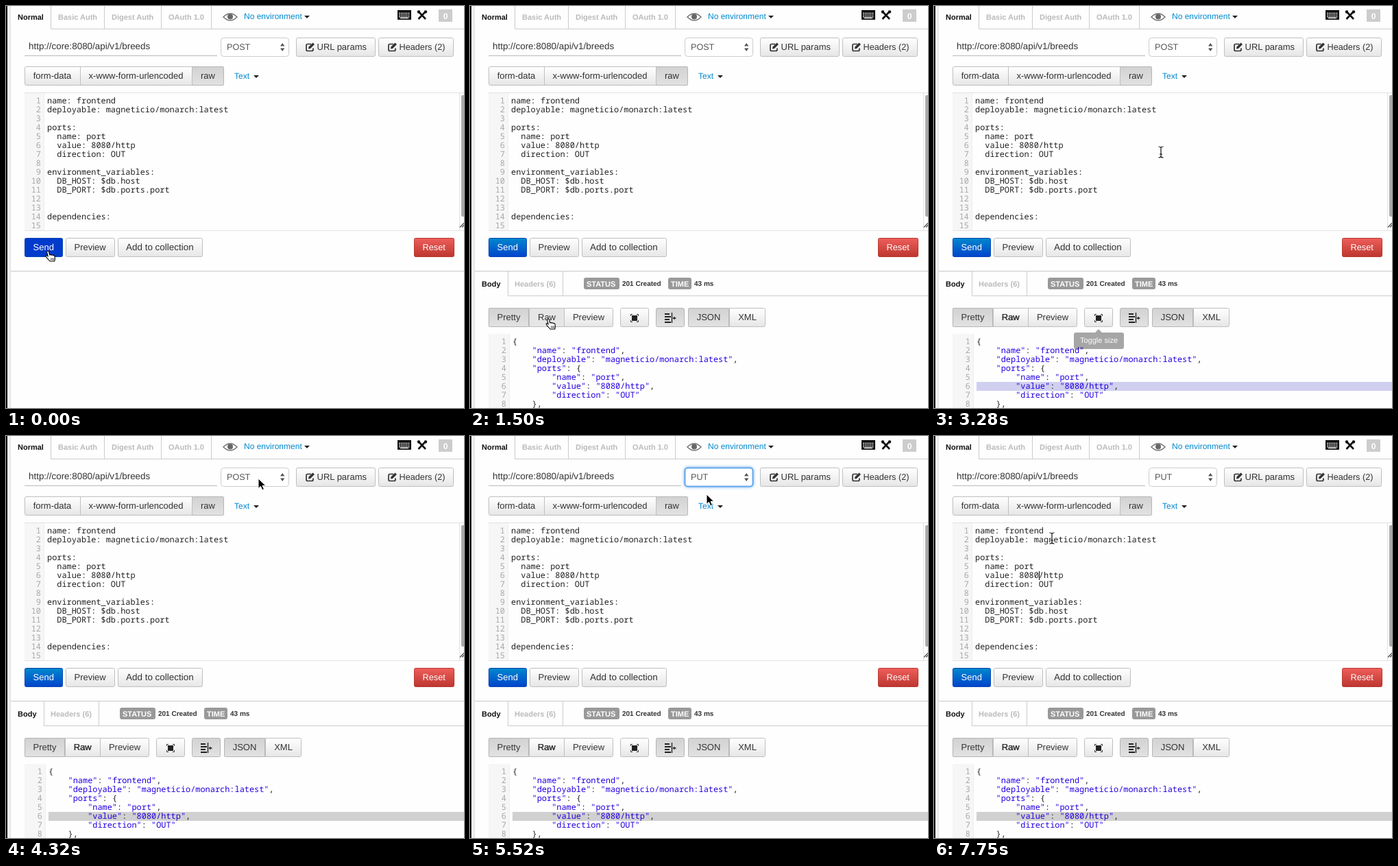
An HTML page that plays this animation: 668 by 586 pixels, repeating every 8 s.

```html
<!DOCTYPE html>
<html lang="en">
<head>
<meta charset="utf-8">
<title>API client</title>
<style>
html, body { margin: 0; width: 100%; height: 100%; overflow: hidden; background: #fefefe; }
svg { display: block; width: 668px; height: 586px; }
text { font-family: "Liberation Sans", Arial, sans-serif; text-rendering: geometricPrecision; }
.mono { font-family: "Noto Sans Mono", monospace; font-size: 11.91px; white-space: pre; }
.bold { font-weight: bold; }
</style>
</head>
<body>
<svg id="stage" viewBox="0 0 668 586" xmlns="http://www.w3.org/2000/svg"></svg>
<script>
const LOOP = 8000, TICK = 148.8, ROW = 13;
const stage = document.getElementById('stage');

const text = (x, y, s, size = 13, fill = '#333', more = '') =>
  `<text x="${x}" y="${y}" font-size="${size}" fill="${fill}" ${more}>${s}</text>`;
const bold = (x, y, s, size = 11, fill = '#bbb', more = '') => text(x, y, s, size, fill, 'class="bold" ' + more);
const rect = (x, y, w, h, fill, more = '') =>
  `<rect x="${x}" y="${y}" width="${w}" height="${h}" fill="${fill}" ${more}/>`;
const path = (d, fill, more = '') => `<path d="${d}" fill="${fill}" ${more}/>`;
const line = (d, stroke = '#ccc', width = 1) => path(d, 'none', `stroke="${stroke}" stroke-width="${width}"`);
const group = (id, body, more = '') => `<g id="${id}" ${more}>${body}</g>`;
const gradient = (id, top, bottom) =>
  `<linearGradient id="${id}" x2="0" y2="1"><stop stop-color="${top}"/><stop offset="1" stop-color="${bottom}"/></linearGradient>`;

const button = (x, y, w, fill = 'url(#plain)', stroke = '#bfbfbf', id = '') =>
  rect(x + .5, y + .5, w - 1, 27, fill, `rx="2" stroke="${stroke}" ${id && `id="${id}"`}`);
const caretDown = (x, y, fill) => path(`M${x - 4} ${y}h8l-4 4z`, fill);
const editIcon = x =>
  line(`M${x + 8} 55.5h-5q-2 0-2 2v6q0 2 2 2h6q2 0 2-2v-2`, '#333', 1.7) +
  path(`M${x + 4} 62.5l.5-3 6-6 2.5 2.5-6 6z`, '#333');

// A row of joined buttons: edges are the x positions, active is the pressed one.
function segments(y, edges, labels, active) {
  const last = edges[edges.length - 1];
  let out = button(edges[0], y, last - edges[0]);
  labels.forEach((label, i) => {
    const w = edges[i + 1] - edges[i];
    if (i === active) out += button(edges[i], y, w, 'url(#pressed)', '#b5b5b5');
    if (i) out += line(`M${edges[i] + .5} ${y}v28`, '#bfbfbf');
    out += text(edges[i] + w / 2, y + 18, label, 13, '#333', 'text-anchor="middle"');
  });
  return out;
}

function code(x, numberX, baseline, rows, fill) {
  return rows.map((row, i) => {
    const y = baseline + i * ROW;
    return text(numberX, y, i + 1, 11.91, '#a8a8a8', 'class="mono" text-anchor="end"') +
      text(x, y, row, 11.91, fill(row), 'class="mono"');
  }).join('');
}

const request = ['name: frontend', 'deployable: magneticio/monarch:latest', '', 'ports:', '  name: port',
  '  value: 8080/http', '  direction: OUT', '', 'environment_variables:', '  DB_HOST: $db.host',
  '  DB_PORT: $db.ports.port', '', '', 'dependencies:', ''];
const reply = ['{', '    "name": "frontend",', '    "deployable": "magneticio/monarch:latest",', '    "ports": {',
  '        "name": "port",', '        "value": "8080/http",', '        "direction": "OUT"', '    },'];
const tint = row => row.replace(/"[^"]*"/g, '<tspan fill="#2200e0">$&</tspan>');
const methods = ['GET', 'POST', 'PUT', 'PATCH', 'DELETE', 'COPY', 'HEAD', 'OPTIONS', 'LINK', 'UNLINK', 'PURGE'];

const defs = '<defs>' + gradient('plain', '#fff', '#e6e6e6') + gradient('pressed', '#d2d2d2', '#e2e2e2') +
  gradient('blue', '#0088cc', '#0044cc') + gradient('red', '#ee5f5b', '#bd362f') +
  gradient('pick', '#5b93f5', '#2467ee') + '</defs>';

const frame = rect(0, 0, 668, 586, '#fefefe') + rect(2, 0, 5, 586, '#efefef') +
  rect(0, 0, 2, 586, '#000') + line('M6.5 0v586', '#e0e0e0');

const keys = [0, 1, 2].map(r => line(`M573 ${10.5 + r * 2.6}h16`, '#fff', 1.2)).join('') +
  [0, 1, 2, 3, 4, 5].map(c => line(`M${575.5 + c * 2.5} 9v7.5`, '#111', .8)).join('');

const header =
  line('M65.5 0v33.5H668M143.5 0v33M226.5 0v33M299.5 0v33') +
  bold(17, 20, 'Normal', 11, '#111') + bold(76, 20, 'Basic Auth') +
  bold(154, 20, 'Digest Auth') + bold(237, 20, 'OAuth 1.0') +
  path('M317 16q10-10 20 0q-10 10-20 0z', '#fff', 'stroke="#777" stroke-width="1.6"') +
  '<circle cx="327" cy="15.5" r="4" fill="#666"/>' +
  text(347, 19, 'No environment', 12, '#0088cc') + caretDown(439, 14, '#222') +
  rect(571, 6, 20, 14, '#111') + keys + line('M575 17.5h12', '#fff', 1.4) +
  line('M601.5 8l10.5 11M612 8l-10.5 11', '#111', 2.6) +
  '<circle cx="602" cy="8.5" r="2.2" fill="#111"/><circle cx="612" cy="8.5" r="2.2" fill="#111"/>' +
  rect(631, 5, 20, 18, '#ccc') + bold(641, 18.5, '0', 12, '#fff', 'text-anchor="middle"');

const urlRow =
  text(33, 63, 'http://core:8080/api/v1/breeds', 13.4) + line('M27 72.5h281', '#bbb') +
  rect(313.5, 46.5, 99, 27, '#fff', 'id="select" rx="4" stroke="#ccc"') +
  '<text id="method" x="322" y="64" font-size="12.6" fill="#555"></text>' +
  path('M400 58.5l3.2-4.5 3.2 4.5zM400 61.5l3.2 4.5 3.2-4.5z', '#555') +
  button(423, 46, 116) + editIcon(437) + text(453.5, 64, 'URL params') +
  button(543, 46, 110) + editIcon(557) + text(573.5, 64, 'Headers (2)', 12.7);

const editor =
  segments(88, [27, 108, 271, 318], ['form-data', 'x-www-form-urlencoded', 'raw'], 2) +
  text(333, 106, 'Text', 12, '#0088cc') + caretDown(365, 101, '#222') +
  rect(27, 126, 28, 201, '#f6f6f6') + line('M55.5 126v201', '#eee') +
  line('M27 126.5h641M27 327.5h641M661.5 127v200', '#e2e2e2') +
  rect(664, 130, 6, 177, '#aaa', 'rx="2"') +
  line('M662 322.5l6-6M665 322.5l3-3', '#444', 1.2) +
  code(60, 51, 142, request, () => '#222') + rect(153, 197, 1, 13, '#000', 'id="caret"') +
  button(27, 338, 56, 'url(#blue)', '#0a45b5', 'send') + text(39.5, 356, 'Send', 13, '#fff') +
  button(87, 338, 72) + text(99.5, 356, 'Preview') +
  button(163, 338, 124) + text(175, 356, 'Add to collection', 13.45) +
  button(595, 338, 59, 'url(#red)', '#b5382f') + text(607.5, 356, 'Reset', 12.8, '#fff') +
  line('M7 386.5h661', '#c8c8c8');

const response =
  line('M55.5 387v35.5H668M135.5 387v35') +
  bold(17, 409, 'Body', 11, '#111') + bold(65, 409, 'Headers (6)') +
  rect(166, 396, 52, 17, '#999', 'rx="3"') + bold(170, 408.5, 'STATUS', 11, '#fff') +
  bold(222, 408, '201 Created', 10, '#333') +
  rect(289, 396, 34, 17, '#999', 'rx="3"') + bold(293, 408.5, 'TIME', 11, '#fff') +
  bold(327, 408, '43 ms', 10, '#333') +
  segments(440, [27, 86, 137, 209], ['Pretty', 'Raw', 'Preview'], 0) +
  rect(87, 441, 50, 26, '#e6e6e6', 'id="rawHover"') + text(99, 458, 'Raw', 13, '#333') +
  button(219, 440, 42) + rect(236, 451, 8, 8, '#222') +
  line('M234.5 452v-2.5h2.5M243 449.5h2.5v2.5M245.5 458v2.5H243M237 460.5h-2.5V458', '#333') +
  button(271, 440, 42, 'url(#pressed)', '#b5b5b5') +
  line('M284 449h7M284 453h9M284 457h7M284 461h9', '#222', 2) + line('M294.5 447v15', '#222', 1.4) +
  path('M295.5 455l3-2.5v1.7h2v1.6h-2v1.7z', '#222') +
  segments(440, [318, 378, 431], ['JSON', 'XML'], 0) +
  rect(27, 478, 30, 108, '#f6f6f6') + line('M57.5 478v108', '#eee') +
  rect(62, 548, 606, 13, '#d1cff0', 'id="mark"') +
  code(62, 53, 493, reply.map(tint), () => '#222') +
  rect(234, 548, 1, 13, '#000', 'id="replyCaret"') +
  group('tip', path('M235 476l5-5 5 5z', '#000') + rect(204, 476, 73, 24, '#000', 'rx="3"') +
    text(240.5, 491, 'Toggle size', 11, '#fff', 'text-anchor="middle"'));

const menu = group('menu',
  rect(300, 30, 108, 210, '#000', 'rx="7" opacity=".06"') +
  rect(302.5, 28.5, 103, 207, '#fdfdfd', 'rx="5" stroke="#c4c4c4"') +
  rect(303, 51, 102, 18, 'url(#pick)', 'id="pick"') +
  methods.map((m, i) => text(322, 46.5 + i * 18, m, 12.6, '#222', 'class="item"')).join('') +
  path('M309 59l3 4 5-8', 'none', 'id="check" stroke-width="1.8"'));

const outline = 'stroke="#000" stroke-width="1.1" stroke-linejoin="round"';
const pointers =
  group('hand', path('M-1.5 1q1.5-2 3 0l1.2 5q1.2-1.3 2.4.2q1.4-1 2.4.5q1.8-.8 2.4 1l.6 4-.8 3.3H3l-4.6-5.2q-2-2.6-.8-3.3q1.2-.4 2.6 1.6z', '#fff', outline) +
    line('M4.6 10.5v3M6.6 10.5v3M8.4 10.5v3', '#000', .8)) +
  group('arrow', path('M0 0v14.5l3.4-3.2 2.4 5.4 2.6-1.1-2.4-5.3h4.7z', '#000', 'stroke="#fff" stroke-width="1"')) +
  group('beam', line('M-3.5-8q3 0 3.5 1.5q.5-1.5 3.5-1.5M0-6.5v13M-3.5 8q3 0 3.5-1.5q.5 1.5 3.5 1.5M-2 3h4', '#fff', 2.6) +
    line('M-3.5-8q3 0 3.5 1.5q.5-1.5 3.5-1.5M0-6.5v13M-3.5 8q3 0 3.5-1.5q.5 1.5 3.5 1.5M-2 3h4', '#111', 1.2));

stage.innerHTML = defs + frame + header + urlRow + editor + group('response', response) + menu + pointers;

const el = id => document.getElementById(id);
const show = (id, on) => el(id).setAttribute('visibility', on ? 'visible' : 'hidden');
const set = (id, attrs) => { for (const k in attrs) el(id).setAttribute(k, attrs[k]); };
const within = (n, from, to) => n >= from && n < to;

// Pointer stops: tick, x, y, shape
const stops = [
  [0, 61, 357, 'hand'], [7, 61, 357, 'hand'], [8, 76, 386, 'arrow'], [10, 114, 456, 'hand'],
  [12, 168, 505, 'beam'], [15, 233, 552, 'beam'], [20, 233, 552, 'beam'], [21, 243, 456, 'hand'],
  [22, 331, 213, 'beam'], [24, 358, 112, 'arrow'], [28, 368, 62, 'arrow'], [31, 368, 62, 'arrow'],
  [33, 356, 78, 'arrow'], [35, 356, 78, 'arrow'], [37, 345, 85, 'arrow'], [39, 260, 140, 'beam'],
  [42, 153, 203, 'beam'], [43, 153, 203, 'beam'], [46, 172, 149, 'beam'], [54, 172, 149, 'beam']
];

function pointerAt(n) {
  let i = 0;
  while (i < stops.length - 2 && stops[i + 1][0] <= n) i++;
  const [n0, x0, y0, shape] = stops[i], [n1, x1, y1] = stops[i + 1];
  const k = (n - n0) / (n1 - n0);
  return { x: Math.round(x0 + (x1 - x0) * k), y: Math.round(y0 + (y1 - y0) * k), shape };
}

function draw(time) {
  const n = Math.floor((time % LOOP) / TICK);

  const p = pointerAt(n);
  for (const shape of ['hand', 'arrow', 'beam']) show(shape, shape === p.shape);
  set(p.shape, { transform: `translate(${p.x} ${p.y})` });

  set('send', { fill: n < 8 ? '#003bcb' : 'url(#blue)' });
  set('response', { display: n < 2 ? 'none' : 'inline' });
  set('rawHover', { opacity: within(n, 10, 11) ? 1 : 0 });

  // A word is selected first, then the whole line.
  const word = n === 18;
  set('mark', {
    x: word ? 227 : 62, width: word ? 29 : 606,
    fill: n < 28 ? '#d1cff0' : '#d0d0d0', opacity: n < 18 ? 0 : 1
  });
  set('replyCaret', { opacity: within(n, 16, 18) ? 1 : 0 });
  set('tip', { opacity: within(n, 21, 23) ? .34 : 0 });

  const focus = within(n, 30, 43);
  el('method').textContent = n < 35 ? 'POST' : 'PUT';
  set('select', {
    stroke: focus ? '#66a8ec' : '#ccc',
    'stroke-width': focus ? 2 : 1,
    style: focus ? 'filter:drop-shadow(0 0 2px #6fb0f0)' : ''
  });

  const picked = n < 33 ? 1 : 2;
  show('menu', within(n, 30, 35));
  set('pick', { y: 33 + picked * 18 });
  set('check', { stroke: picked === 1 ? '#fff' : '#222' });
  document.querySelectorAll('.item').forEach((item, i) => item.setAttribute('fill', i === picked ? '#fff' : '#222'));

  show('caret', n >= 43 && !within(n, 48, 52));
}

const start = performance.now();
function tick() {
  draw(performance.now() - start);
  requestAnimationFrame(tick);
}
tick();
</script>
</body>
</html>
```
